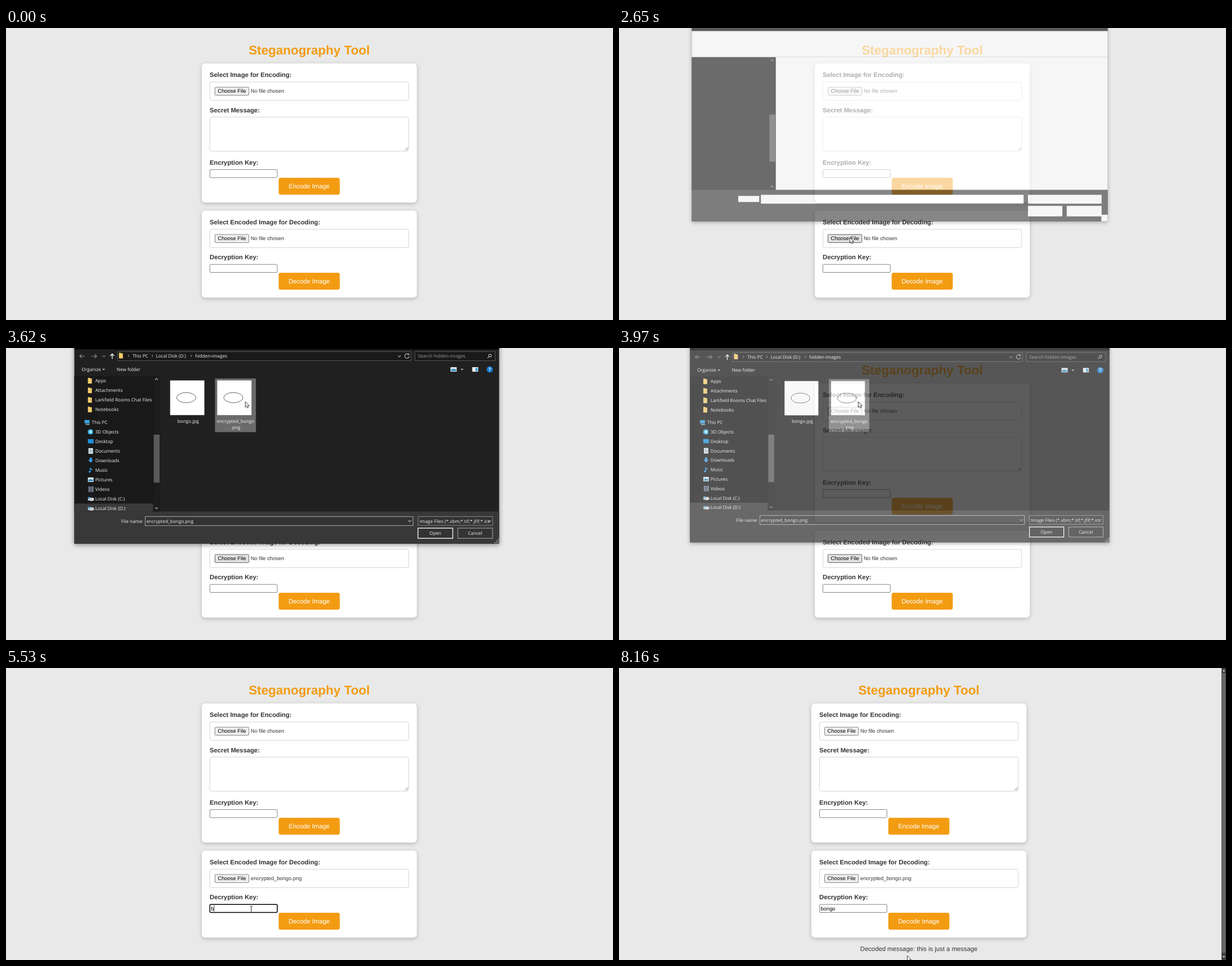
These frames come from a looping animation (1079x519 px, 8.23 s). An HTML page:

```html
<!DOCTYPE html>
<html lang="en">
<head>
<meta charset="utf-8">
<title>Steganography Tool</title>
<style>
html, body { margin: 0; width: 100%; height: 100%; overflow: hidden; background: #e9e9e9; }
svg { display: block; width: 100%; height: 100%; text-rendering: geometricPrecision; }
text { white-space: pre; }
.page { font: 11.3px "Liberation Sans", Arial, sans-serif; fill: #333; }
.page .title { font-size: 22.45px; font-weight: bold; fill: #f39c12; }
.page .label { font-weight: bold; }
.page .small { font-size: 9.4px; }
.card { filter: drop-shadow(0 2.8px 3.5px rgba(0, 0, 0, .22)); }
.dialog { font: 8.2px "Open Sans", "Noto Sans", sans-serif; fill: #f2f2f2; }
.shade { filter: drop-shadow(0 2px 4px rgba(0, 0, 0, .45)); }
</style>
</head>
<body>
<svg id="stage" viewBox="0 0 1079 519"></svg>
<script>
const LOOP = 8230;

// Markup helpers
const rect = (x, y, w, h, fill, more = '') =>
  `<rect x="${x}" y="${y}" width="${w}" height="${h}" fill="${fill}" ${more}/>`;
const text = (x, y, s, more = '') => `<text x="${x}" y="${y}" ${more}>${s}</text>`;
const line = (d, color = '#ccc', width = 1, more = '') =>
  `<path d="${d}" fill="none" stroke="${color}" stroke-width="${width}" ${more}/>`;
const shape = (d, fill) => `<path d="${d}" fill="${fill}"/>`;
const group = (id, body, more = '') => `<g id="${id}" ${more}>${body}</g>`;
const down = (x, y, color) => line(`M${x - 2.5} ${y - 1.2}l2.5 2.5 2.5-2.5`, color);
const right = (x, y) => line(`M${x - 1} ${y - 2}l2 2-2 2`, '#bbb', .9);
const stroke = (color, width = 1, r = 0) => `stroke="${color}" stroke-width="${width}" rx="${r}"`;
const middle = 'text-anchor="middle"';

// Web page
const card = (y, h) => rect(348, y, 382.3, h, '#fff', 'class="card" rx="6.5"');
const label = (y, s) => text(362, y, s, 'class="label"');
const box = (y, h) => rect(362.4, y, 353.4, h, '#fff', stroke('#d0d0d0', .9, 3.2));
const field = (y, id) => rect(362.4, y, 119.8, 14.3, '#fff', `id="${id}" ` + stroke('#767676', .9, 1.4));
const picker = (y, id, nameId) => box(y, 32.6) +
  rect(371.5, y + 9.2, 60.2, 14.4, '#efefef', `id="${id}" ` + stroke('#767676', .9, 1.4)) +
  text(376.6, y + 19.2, 'Choose File', 'class="small" fill="#000"') +
  text(435, y + 19.2, 'No file chosen', `id="${nameId}" class="small"`);
const button = (y, s, id) => rect(484.7, y, 108.6, 30, '#f39c12', `id="${id}" rx="3.5"`) +
  text(538.9, y + 18.9, s, `fill="#fff" ${middle}`);

const page = group('page',
  text(539, 47, 'Steganography Tool', `class="title" ${middle}`) +
  card(63, 247.3) + label(87.3, 'Select Image for Encoding:') + picker(96, 'pick1', 'name1') +
  label(149.5, 'Secret Message:') + box(158.2, 60.8) +
  line('M709.3 217.3l5-5M712.3 217.3l2-2', '#555', .8) +
  label(243, 'Encryption Key:') + field(251.6, 'key1') + button(266.2, 'Encode Image', 'encode') +
  card(324.6, 154.6) + label(349, 'Select Encoded Image for Decoding:') + picker(357.8, 'pick2', 'name2') +
  label(411.3, 'Decryption Key:') + field(420.2, 'key2') + button(435, 'Decode Image', 'decode') +
  text(364.5, 430.7, '', 'id="typed" class="small" fill="#000"') +
  line('M365 432.2' + 'q1 -1.6 2 0t2 0'.repeat(6), '#e33', .8, 'id="squiggle"') +
  rect(364.2, 422.2, .8, 10.8, '#000', 'id="caret"') +
  text(539, 503.4, 'Decoded message: this is just a message', `id="message" ${middle}`),
  'class="page"');

const scrollbar = group('scrollbar', rect(1071, 0, 8, 519, '#404040') + rect(1071.8, 9, 6.4, 497, '#686868') +
  shape('M1073 6l2.2-3 2.2 3zM1073 512l2.2 3 2.2-3z', '#ddd'));

// File dialog
const folder = (x, y) => shape(`M${x} ${y - 5}h3l1 1h3v9h-7z`, '#f3cb6b');
const navIcons = {
  'This PC': (x, y) => rect(x, y - 4, 9, 6, '#3aa0e0') + rect(x + 2, y + 3, 7, 1.5, '#9cc'),
  '3D Objects': (x, y) => shape(`M${x} ${y - 3}l5-2 4 2v6l-4 2-5-2z`, '#35b0e6') + rect(x + 3, y - 2, 3.5, 4, '#dff'),
  'Desktop': (x, y) => rect(x, y - 4, 10, 7.5, '#1e90dd'),
  'Documents': (x, y) => rect(x + 1, y - 5, 8, 10, '#dce6ea') + line(`M${x + 3} ${y - 2}h4m-4 2h4m-4 2h4`, '#58a', .8),
  'Downloads': (x, y) => shape(`M${x + 3} ${y - 5}h4v4h2.5l-4.5 5-4.5-5h2.5z`, '#3b9fe8'),
  'Music': (x, y) => line(`M${x + 4} ${y + 3}v-7q1 3 4 3`, '#2d9cf0', 1.4) + `<circle cx="${x + 3}" cy="${y + 3}" r="1.7" fill="#2d9cf0"/>`,
  'Pictures': (x, y) => rect(x, y - 4, 10, 8, '#dbe9f0') + shape(`M${x + 1} ${y + 3}v-3l3-1 5 1v3z`, '#3b8fc0'),
  'Videos': (x, y) => rect(x + 1, y - 5, 9, 10, '#555f70') + line(`M${x + 2} ${y - 5}v10M${x + 9} ${y - 5}v10`, '#ccc', 1, 'stroke-dasharray="1"')
};
const drive = (x, y) => shape(`M${x} ${y}l3-2h6l2 2v2.500l-4 1.500-7-1.500z`, '#c9ced2') + rect(x, y - 3, 4, 2.500, '#3aa0e0');
const nav = (s, y, x = 160) => text(x, y + 3, s) + (navIcons[s] || (s.includes('Disk') ? drive : folder))(x - 13, y);

const thumb = x => rect(x, 58, 60.6, 61.4, '#fff') +
  `<ellipse cx="${x + 28.5}" cy="88.500" rx="17" ry="9" fill="#fff" stroke="#555" stroke-width=".9"/>`;
const dots = [[6, 0], [3, 3], [6, 3], [0, 6], [3, 6], [6, 6]]
  .map(([x, y]) => rect(867 + x, 338.5 + y, 1.6, 1.6, '#bbb')).join('');

const frame = rect(123, -47, 752, 394, '#202020', 'class="shade"') + rect(123, -47, 752, 50, '#000') +
  rect(123, 50, 152, 240, '#191919') + rect(123, 290, 752, 57, '#383838') +
  rect(263, 50, 11.5, 240, '#1c1c1c') + rect(263.5, 154, 10.5, 85, '#5a5a5a') +
  line('M266 57l2.500-2.500 2.500 2.500') + down(268.5, 284);

const skeleton = group('skeleton', [
  [123, 3, 752, 47], [275, 50, 600, 240], [207, 301, 38, 11], [248, 299, 475, 16],
  [731, 299, 133, 16], [731, 319, 62, 19], [801, 319, 63, 19], [863.5, 335, 11.5, 12]
].map(r => rect(...r, '#fff')).join(''));

const detail = group('detail',
  rect(199.5, 7, 519.5, 16, '#191919', stroke('#555')) + rect(726, 7, 142, 16, '#191919', stroke('#555')) +
  line('M141 15h-8.500m3.500-3.500l-3.500 3.500 3.500 3.500M154 15h8.500m-3.500-3.500l3.500 3.500-3.500 3.500', '#999') +
  down(175.5, 15, '#999') + line('M190 20v-9m-3.500 3.500l3.500-3.500 3.500 3.500', '#fff', 1.3) +
  folder(202, 14) + right(219, 14.5) + text(226, 17.7, 'This PC') + right(261, 14.5) +
  text(267.5, 17.7, 'Local Disk (D:)') + right(330, 14.5) + text(337, 17.7, 'hidden-images') +
  down(698.5, 15) + line('M715 12a4 4 0 1 0 1 3m-1-5v2.500h-2.500') +
  text(731, 18, 'Search hidden-images', 'fill="#999"') +
  '<circle cx="859" cy="14" r="2.400" fill="none" stroke="#ccc"/>' + line('M857.3 15.700l-3 3') +
  text(136, 41.6, 'Organize') + shape('M172.500 37.500h5l-2.500 2.500z', '#ccc') + text(198, 41.6, 'New folder') +
  rect(789, 34.5, 11, 8, '#dbe9f0') + shape('M790 41.500v-3l4-1 5 1v3z', '#3b8fc0') +
  shape('M807 37.500h5l-2.500 2.500z', '#ccc') + rect(827.5, 34.5, 10.5, 8, '#eee') + rect(833, 36, 4, 5.5, '#3ba0e0') +
  '<circle cx="858.500" cy="38.500" r="5.500" fill="#1b7fd4"/>' + text(858.5, 41.5, '?', `${middle} font-weight="bold"`) +
  rect(123, 276, 139.5, 14, '#3a3a3a') +
  ['Apps', 'Attachments', 'Larkfield Rooms Chat Files', 'Notebooks'].map((s, i) => nav(s, 58.5 + 17 * i)).join('') +
  nav('This PC', 132, 154) +
  ['3D Objects', 'Desktop', 'Documents', 'Downloads', 'Music', 'Pictures', 'Videos', 'Local Disk (C:)', 'Local Disk (D:)']
    .map((s, i) => nav(s, 149 + 16.95 * i)).join('') +
  rect(372, 54.5, 72.5, 95, '#4d4d4d', 'id="tile"') + thumb(292.6) + thumb(376) +
  text(324.5, 132.7, 'bongo.jpg', middle) +
  text(408.5, 132.7, 'encrypted_bongo', middle) + text(408.5, 144.3, '.png', middle) +
  text(245, 310, 'File name:', 'text-anchor="end"') +
  rect(248.500, 299, 474, 16, '#333', stroke('#aaa')) + rect(250.5, 301.5, .8, 11, '#fff', 'id="fileCaret"') +
  text(250.5, 310, '', 'id="fileName"') + down(717, 307) +
  rect(731.5, 299, 132, 15.500, '#333', stroke('#888')) + text(734, 310, 'Image Files (*.xbm;*.tif;*.jfif;*.icc') + down(858, 307) +
  rect(731.5, 319.500, 61.5, 18, '#333', stroke('#fff', 1.3)) + text(762, 331.400, 'Open', middle) +
  rect(802, 319.500, 61.5, 18, '#333', stroke('#aaa')) + text(832.5, 331.400, 'Cancel', middle) + dots);

const outline = 'fill="#fff" stroke="#111" stroke-width=".8" stroke-linejoin="round"';
const cursors =
  `<path id="arrow" d="M.4.4v10l2.300-2.100 1.500 3.300 1.700-.8-1.500-3.200h3z" ${outline}/>` +
  line('M-2-5.500h1.500l.5.500.5-.500h1.500M0-5v10M-2 5.500h1.500l.5-.500.5.500h1.500', '#111', .9, 'id="beam"') +
  `<path id="hand" d="M-1 1q0-1 1-1t1 1v4.200q2-.7 2 .5 1.800-.5 1.900.6 1.400-.2 1.400 1v2.200l-1 2v1.500h-5.300v-1.200l-3.300-3.600q-.2-1.500 1.300-.9l1 .8z" ${outline}/>`;

const stage = document.getElementById('stage');
stage.innerHTML = page + scrollbar + group('dialog', frame + skeleton + detail, 'class="dialog"') + group('cursor', cursors);
const el = Object.fromEntries([...stage.querySelectorAll('[id]')].map(node => [node.id, node]));

// Tracks: time followed by values, interpolated between rows
const pointer = [
  [270, 1036, 510], [1030, 679, 357], [1100, 655, 347], [1400, 540, 332], [1700, 440, 360], [1910, 410, 372],
  [2650, 410, 372], [2780, 414, 366], [3100, 432, 230], [3410, 424, 105], [3600, 425, 95], [3970, 425, 95],
  [4090, 428, 107], [4230, 440, 257], [4780, 447, 424], [4925, 447, 424], [4930, 436, 429], [6590, 436, 429],
  [6950, 513, 446], [7540, 513, 446], [7800, 513, 470], [8160, 512, 511]
];
const dialogPose = [ // scale, opacity
  [2560, .974, .2], [2650, .983, .6], [2780, 1, .92], [2850, 1.004, 1],
  [3900, 1.004, 1], [3970, .992, .73], [4080, .976, .1]
];
const glow = [[6720, 0], [6950, 1], [7740, 1], [8040, 0]];

function at(track, t) {
  const i = track.findIndex(row => row[0] > t);
  if (i === 0) return track[0].slice(1);
  if (i < 0) return track.at(-1).slice(1);
  const a = track[i - 1], b = track[i], k = (t - a[0]) / (b[0] - a[0]);
  return a.slice(1).map((v, j) => v + (b[j + 1] - v) * k);
}
const show = (node, on) => node.setAttribute('visibility', on ? 'inherit' : 'hidden');
const set = (node, attrs) => { for (const k in attrs) node.setAttribute(k, attrs[k]); };
const during = (t, from, to) => t >= from && t < to;
const write = (node, s) => { if (node.textContent !== s) node.textContent = s; };

function draw(t) {
  const open = during(t, 2560, 4080), chosen = t >= 4040, done = t >= 7210;
  const [x, y] = at(pointer, t);

  // Page
  set(el.page, { transform: `translate(${done ? -6 : 0} 0)` });
  show(el.scrollbar, done);
  show(el.message, done);
  write(el.name2, chosen ? 'encrypted_bongo.png' : 'No file chosen');
  const pressed = during(t, 2250, 2380), hover = during(t, 1840, 4040);
  set(el.pick2, { fill: pressed ? '#f5f5f5' : hover ? '#e3e3e3' : '#efefef', stroke: pressed ? '#8d8d8d' : hover ? '#4f4f4f' : '#767676' });
  const focus = during(t, 4780, 7080);
  set(el.key2, { stroke: focus ? '#000' : '#767676', 'stroke-width': focus ? 1.5 : .9 });
  const count = Math.max(0, Math.min(5, Math.floor((t - 5430) / 100)));
  write(el.typed, 'bongo'.slice(0, count));
  show(el.squiggle, during(t, 5930, 7080));
  show(el.caret, during(t, 4780, 5330) || during(t, 5530, 6460) || during(t, 6990, 7080));
  set(el.caret, { x: 364.2 + 5.22 * count });
  const [g] = at(glow, t);
  set(el.decode, { fill: `rgb(${243 - 13 * g},${156 - 30 * g},${18 + 16 * g})` });

  // Dialog
  show(el.dialog, open);
  const [scale, opacity] = at(dialogPose, t);
  set(el.dialog, { opacity, transform: `translate(499 150) scale(${scale}) translate(-499 -150)` });
  const loaded = t >= 2690, selected = t >= 3600;
  show(el.skeleton, open && !loaded);
  show(el.detail, open && loaded);
  show(el.tile, open && loaded && t > 2850 && y < 149);
  set(el.tile, { fill: selected ? '#6a6a6a' : '#4d4d4d' });
  write(el.fileName, selected ? 'encrypted_bongo.png' : '');
  show(el.fileCaret, open && loaded && !selected);

  // Pointer
  const inText = !open && x > 362 && x < 482 &&
    [[158, 219], [251, 266], [419, 436]].some(([a, b]) => y > a && y < b);
  const onButton = x > 485 && x < 593 && y > 435 && y < 465;
  show(el.cursor, t >= 270);
  set(el.cursor, { transform: `translate(${x} ${y})` });
  show(el.beam, t >= 270 && inText);
  show(el.hand, t >= 270 && onButton);
  show(el.arrow, t >= 270 && !inText && !onButton);
}

function tick() {
  draw(performance.now() % LOOP);
  requestAnimationFrame(tick);
}
tick();
</script>
</body>
</html>
```
